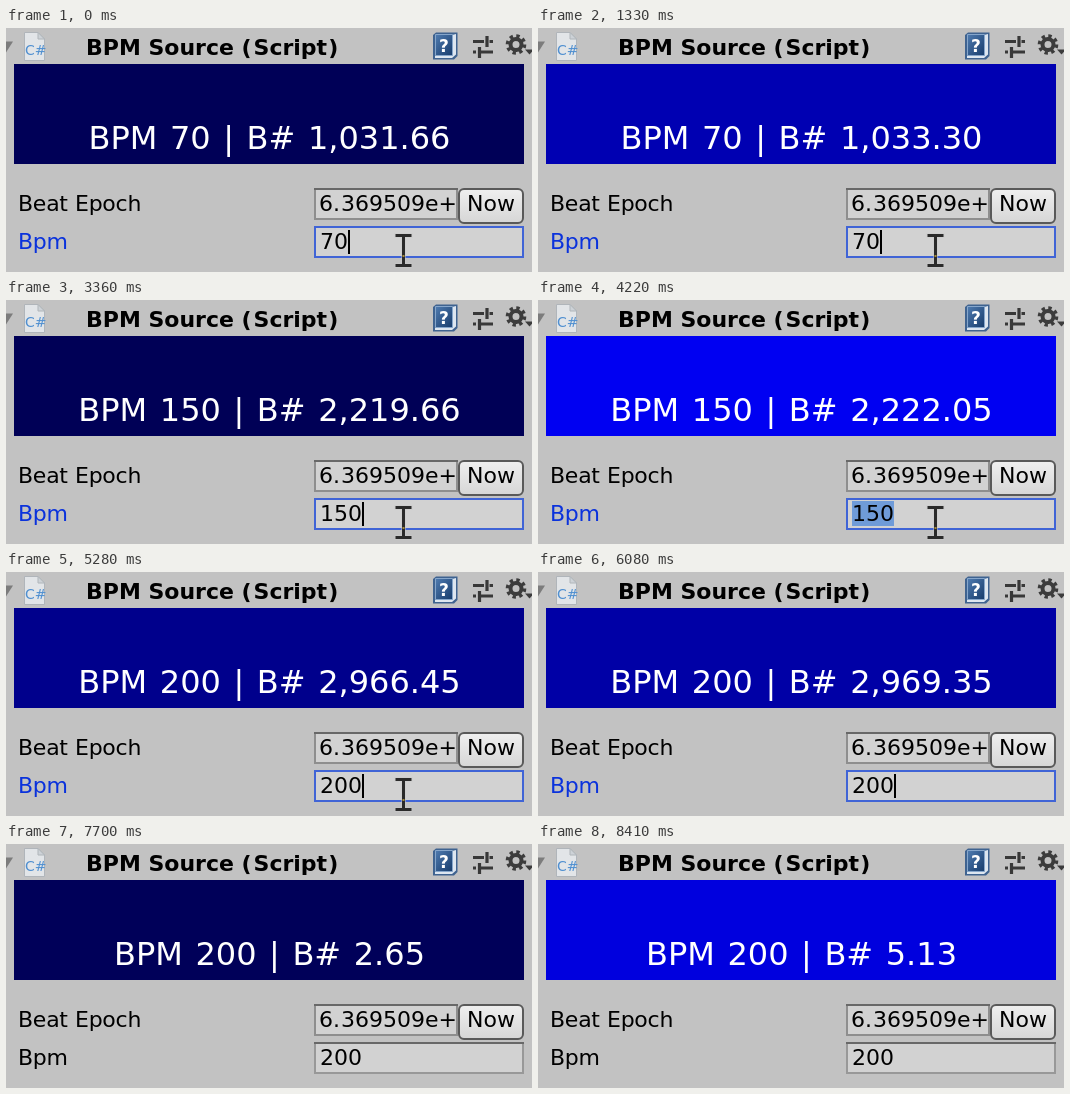
These frames come from a looping animation (526x244 px, 8.46 s). An HTML page:

```html
<!DOCTYPE html>
<html lang="en">
<head>
<meta charset="utf-8">
<title>BPM Source</title>
<style>
  html, body { margin: 0; width: 100%; height: 100%; overflow: hidden; background: #c2c2c2; }
  svg { display: block; width: 526px; height: 244px; }
  text { font: 22px "DejaVu Sans", Verdana, sans-serif; white-space: pre; font-kerning: none; }
  .title { font-weight: bold; }
  .label { letter-spacing: -.25px; word-spacing: .5px; }
  #readout { font-size: 32px; word-spacing: 2.4px; fill: #fff; text-anchor: middle; }
  .focus #bpmLabel { fill: #0a32dc; }
  .focus #plain, #stage:not(.focus) #ring { display: none; }
  .down #face { fill: #b4b4b4; }
</style>
</head>
<body>
<svg id="stage" viewBox="0 0 526 244">
  <defs>
    <linearGradient id="btn" x2="0" y2="1">
      <stop offset="0" stop-color="#efefef"/><stop offset="1" stop-color="#d6d6d6"/>
    </linearGradient>
    <linearGradient id="cover" x2="1" y2="1">
      <stop offset="0" stop-color="#4f7bb0"/><stop offset="1" stop-color="#173c6c"/>
    </linearGradient>
    <clipPath id="epochClip"><rect x="308" y="160" width="142" height="34"/></clipPath>
  </defs>
  <rect width="526" height="244" fill="#c2c2c2"/>

  <!-- header -->
  <path d="M-7 13.500H7L0 24.500Z" fill="#7c7c7c"/>
  <path d="M18.500 4.500H32L38.500 11V32.500H18.500Z" fill="#e2e5e8" stroke="#b0b5ba"/>
  <path d="M32 4.500V11H38.500Z" fill="#cdd2d7" stroke="#b0b5ba"/>
  <text x="19" y="26.500" style="font-size:14px" fill="#4f8fd0">C#</text>
  <text class="title" x="80" y="27">BPM Source (<tspan dx="2">Script</tspan><tspan dx="1">)</tspan></text>
  <path d="M427 7L430 4.500H451.500V28L448 31.500H427Z" fill="#3f6390"/>
  <path d="M446 7L450 6V26.500L446 30H429V27.500H446Z" fill="#dde6f0"/>
  <path d="M429.500 6.500H446.500V27.500H429.500Z" fill="url(#cover)" stroke="#86a6cb"/>
  <text x="433" y="23.500" style="font-size:17px;font-weight:bold" fill="#fff">?</text>
  <path d="M467 13.500H478M483.500 13.500H487M481 8V19M467 24H470M475 24H487M473.500 19V30"
        stroke="#383838" stroke-width="3.200"/>
  <g stroke="#3c3c3c" fill="none">
    <circle cx="510" cy="16.500" r="5.500" stroke-width="4"/>
    <circle cx="510" cy="16.500" r="8.500" stroke-width="3.600" stroke-dasharray="3.340 3.340"/>
  </g>
  <path d="M519 21.500H528L523.500 26.500Z" fill="#3c3c3c"/>

  <!-- beat display -->
  <rect id="banner" x="8" y="36" width="510" height="100"/>
  <text id="readout" x="263.500" y="121"></text>

  <!-- epoch row -->
  <text class="label" x="12" y="183">Beat Epoch</text>
  <rect x="309" y="161" width="142" height="30" fill="#d2d2d2" stroke="#8e8e8e" stroke-width="2"/>
  <path d="M308 161H452" stroke="#686868" stroke-width="2"/>
  <text x="313" y="183" clip-path="url(#epochClip)">6.<tspan dx="1">369509e+</tspan></text>
  <rect id="face" x="453" y="161" width="64" height="34" rx="5" fill="url(#btn)" stroke="#595959" stroke-width="2"/>
  <text x="461" y="183">Now</text>

  <!-- bpm row -->
  <text class="label" id="bpmLabel" x="12" y="221">Bpm</text>
  <g id="plain">
    <rect x="309" y="199" width="208" height="30" fill="#d2d2d2" stroke="#989898" stroke-width="2"/>
    <path d="M308 199H518" stroke="#686868" stroke-width="2"/>
  </g>
  <rect id="ring" x="309" y="199" width="208" height="30" fill="#d2d2d2" stroke="#4064d6" stroke-width="2"/>
  <rect id="selection" x="314" y="201" height="25" fill="#6f9bd8"/>
  <text id="field" x="314" y="221"></text>
  <rect id="caret" y="202" width="2" height="24"/>

  <!-- pointers -->
  <g id="beam" fill="none">
    <path d="M-9 -14.500H9M0 -14V15M-9 15.500H9" stroke="#c9c9c9" stroke-width="5" opacity=".5"/>
    <path d="M-8 -14.500H8M0 -14V15M-8 15.500H8" stroke="#2a2a2a" stroke-width="3"/>
    <path d="M-1 6H1" stroke="#a58a3c" stroke-width="2"/>
  </g>
  <path id="arrow" d="M0 0V31L7 24.500L13 38L19 35.500L13 22.500H23.500Z" fill="#fff" stroke="#222" stroke-width="1.500" stroke-linejoin="round"/>
</svg>
<script>
const LOOP = 8460, CLICK = 6910, BLUR = 6850;
const DIGIT = 14;
const $ = id => document.getElementById(id);

// runs of evenly spaced updates: first, last, count
const runs = [
  [30, 860, 28], [890, 1730, 29], [1760, 2590, 27], [2620, 3450, 30], [3480, 4300, 29],
  [4330, 5160, 28], [5190, 6030, 30], [6060, 6880, 29], [6910, 7720, 28], [7770, 8410, 23]
];
// loop time in ms, seconds since the epoch
const clock = [[0, 884.28], [2560, 887.028], [4220, 888.82], [5280, 889.935], [6080, 890.805], [6909, 891.7]];
const reset = [[CLICK, 0], [6970, 0.051], [8410, 1.539]];
// start, field text, selected
const edits = [
  [0, "70", 0], [1400, "70", 1], [1970, "1", 0], [2120, "15", 0], [2270, "150", 0],
  [4070, "150", 1], [4600, "2", 0], [4780, "20", 0], [4930, "200", 0]
];
const beamPath = [[5650, 397.5, 222], [5980, 401, 264]];
const arrowPath = [[6330, 512, 248], [6730, 501, 179], [7200, 501, 179], [7620, 497, 248]];

const lastAt = (list, t) => list.filter(k => k[0] <= t).pop() || list[0];

function mix(keys, t, i, ease = x => x) {
  const n = keys.findIndex(k => k[0] > t);
  if (n === 0) return keys[0][i];
  if (n < 0) return keys[keys.length - 1][i];
  const a = keys[n - 1], b = keys[n];
  return a[i] + (b[i] - a[i]) * ease((t - a[0]) / (b[0] - a[0]));
}
const smooth = x => x * x * (3 - 2 * x);

function snap(t) {
  if (t < 30) return 0;
  const [a, b, n] = lastAt(runs, t);
  const step = (b - a) / (n - 1);
  const q = a + Math.min(n - 1, Math.floor((t - a) / step + 1e-6)) * step;
  return Math.max(q, lastAt(clock.concat(reset), t)[0]);
}

function place(el, path, t, shown) {
  el.style.display = shown ? "" : "none";
  el.setAttribute("transform", `translate(${mix(path, t, 1, smooth)} ${mix(path, t, 2, smooth)})`);
}

function draw(now) {
  const t = snap(now % LOOP);
  const [, value, selected] = lastAt(edits, t);
  const beats = mix(t < CLICK ? clock : reset, t, 1) * value / 60;
  const label = beats.toLocaleString("en-US", { minimumFractionDigits: 2, maximumFractionDigits: 2 });
  $("readout").textContent = `BPM ${value} | B# ${label}`;
  $("banner").setAttribute("fill", `rgb(0,0,${Math.round(255 * (1 - beats % 1))})`);

  const focus = t < BLUR;
  $("stage").classList.toggle("focus", focus);
  $("stage").classList.toggle("down", t >= BLUR && t < CLICK);
  $("field").textContent = value;
  $("selection").setAttribute("width", focus && selected ? value.length * DIGIT : 0);
  $("caret").setAttribute("x", 314 + value.length * DIGIT);
  $("caret").style.display = focus && !selected ? "" : "none";

  place($("beam"), beamPath, t, t < 6000);
  place($("arrow"), arrowPath, t, t >= 6330 && t < 7650);
}

const start = performance.now();
function tick() {
  draw(performance.now() - start);
  requestAnimationFrame(tick);
}
draw(0);
requestAnimationFrame(tick);
</script>
</body>
</html>
```
